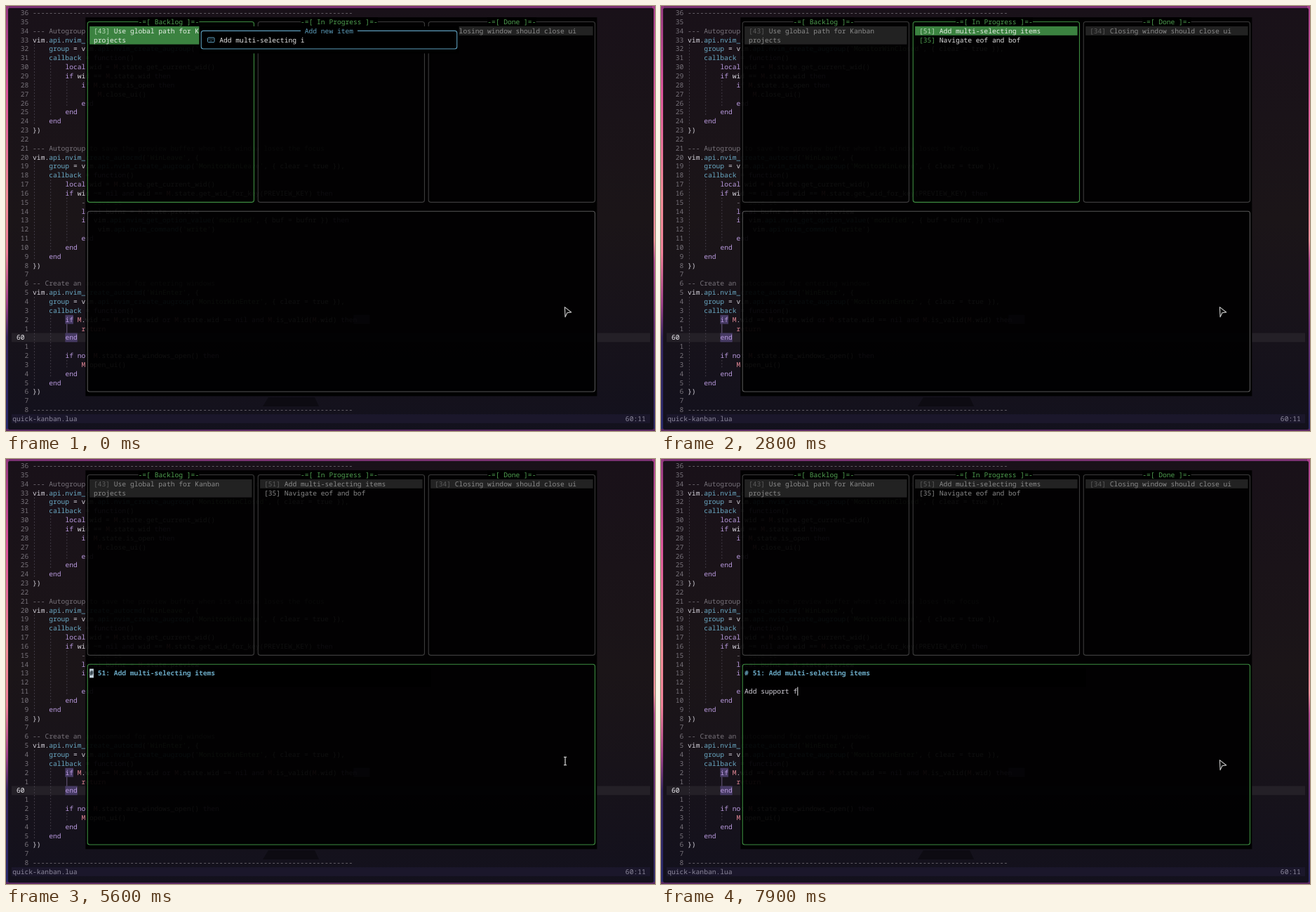
Animation, 925 px wide and 605 px high, one loop 8000 ms. Source, as an HTML page:

```html
<!DOCTYPE html>
<html lang="en">
<head>
<meta charset="utf-8">
<title>Kanban board in a terminal</title>
<style>
  html, body { margin: 0; width: 100%; height: 100%; overflow: hidden; background: #17121a; }
  svg { display: block; width: 925px; height: 605px; }
  text {
    font: 9.643px "Noto Sans Mono", "DejaVu Sans Mono", monospace;
    white-space: pre;
    text-rendering: geometricPrecision;
  }
</style>
</head>
<body>
<svg id="stage" viewBox="0 0 925 605">
  <defs>
    <linearGradient id="left" x2="0" y2="1">
      <stop offset="0" stop-color="#93397f"/><stop offset=".2" stop-color="#d9539a"/>
      <stop offset=".45" stop-color="#f08a96"/><stop offset=".58" stop-color="#ee7f98"/>
      <stop offset=".7" stop-color="#9c3f88"/><stop offset=".78" stop-color="#35265f"/>
      <stop offset="1" stop-color="#28296a"/>
    </linearGradient>
    <linearGradient id="right" x2="0" y2="1">
      <stop offset="0" stop-color="#a8408c"/><stop offset=".25" stop-color="#e0609c"/>
      <stop offset=".55" stop-color="#f0909a"/><stop offset=".6" stop-color="#b04a8e"/>
      <stop offset=".75" stop-color="#6a2f74"/><stop offset="1" stop-color="#2c2a66"/>
    </linearGradient>
    <linearGradient id="term" x2="0" y2="1">
      <stop offset="0" stop-color="#191119"/><stop offset=".5" stop-color="#1b1518"/>
      <stop offset=".72" stop-color="#18131a"/><stop offset="1" stop-color="#13111d"/>
    </linearGradient>
  </defs>
  <g id="editor"></g>
  <g id="board"></g>
</svg>
<script>
const CW = 5.786, RH = 12.84, LOOP = 8000;
const C = {
  white: '#d6d3dc', dim: '#77727a', cyan: '#6aa9c4', violet: '#b99ade', pink: '#dd8593',
  green: '#4f9f50', line: '#3d8c40', select: '#3b8240', grey: '#8a8a8a', guide: '#4a4450',
};

// Grid helpers: column 0 is the first code column, row 0 the top line.
const px = col => 38.1 + col * CW;
const mid = row => 9.7 + row * RH;
const top_ = row => mid(row) - RH / 2;

const rect = (x, y, w, h, fill, more = '') =>
  `<rect x="${x}" y="${y}" width="${w}" height="${h}" fill="${fill}" ${more}/>`;
const cells = (col, row, cols, rows, fill, more) =>
  rect(px(col), top_(row), cols * CW, rows * RH, fill, more);
const text = (col, row, str, fill, more = '') =>
  `<text x="${px(col).toFixed(2)}" y="${(mid(row) + 3.4).toFixed(2)}" fill="${fill}" ${more}>${str}</text>`;
const path = (d, stroke, width = 1, fill = 'none', more = '') =>
  `<path d="${d}" stroke="${stroke}" stroke-width="${width}" fill="${fill}" ${more}/>`;
const frame = (c0, r0, c1, r1, color) =>
  rect(px(c0 + .5), mid(r0), (c1 - c0) * CW, (r1 - r0) * RH, 'none',
    `rx="3" stroke="${color}" stroke-width="1.1"`);

const dashes = '-'.repeat(79);
const code = `${dashes}

--- Autogroup to close all windows when one of them is closed
vim.api.nvim_create_autocmd('WinClosed', {
    group = vim.api.nvim_create_augroup('MonitorWinClosed', { clear = true }),
    callback = function()
        local wid = M.state.get_current_wid()
        if wid == M.state.wid then
            if M.state.is_open then
                M.close_ui()
            end
        end
    end
})

--- Autogroup to save the preview buffer when its window loses the focus
vim.api.nvim_create_autocmd('WinLeave', {
    group = vim.api.nvim_create_augroup('MonitorWinLeave', { clear = true }),
    callback = function()
        local wid = M.state.get_current_wid()
        if wid ~= nil and wid == M.state.get_wid_for_key(PREVIEW_KEY) then
            -- Save it
            local bufnr = M.state.preview
            if vim.api.nvim_get_option_value('modified', { buf = bufnr }) then
                vim.api.nvim_command('write')
            end
        end
    end
})

-- Create an autocommand for entering windows
vim.api.nvim_create_autocmd('WinEnter', {
    group = vim.api.nvim_create_augroup('MonitorWinEnter', { clear = true }),
    callback = function()
        if M.wid == M.state.wid or M.state.wid == nil and M.is_valid(M.wid) then
            return
        end

        if not M.state.are_windows_open() then
            M.open_ui()
        end
    end
})

${dashes}`.split('\n');

const tokens = [
  [/^(local|if|then|end|function|not|and|or|nil)$/, C.violet],
  [/^(return|M)$/, C.pink],
  [/^(api|nvim_\w+|group|callback)$/, C.cyan],
  [/^'/, '#8fb58a'],
];
const paint = line => line.startsWith('--')
  ? `<tspan fill="${C.dim}">${line}</tspan>`
  : line.replace(/'\w+'|\w+/g, word => {
      const rule = tokens.find(([re]) => re.test(word));
      return rule ? `<tspan fill="${rule[1]}">${word}</tspan>` : word;
    });

function drawEditor() {
  let s = rect(0, 0, 925, 605, '#7a3172')
    + rect(0, 0, 4, 605, 'url(#left)') + rect(921, 0, 4, 605, 'url(#right)')
    + rect(0, 602, 925, 3, '#5c2a63')
    + rect(3, 3, 920, 600, 'url(#term)', 'rx="2"')
    + path('M366 570 L374 557 L440 557 L446 570 Z', 'none', 0, '#0d0b12')
    + rect(8, top_(36), 910, RH, '#242027')
    + rect(8, top_(45), 910, RH, '#1b172b')
    + cells(8, 34, 2, 1, '#463a63') + cells(8, 36, 3, 1, '#463a63')
    + cells(79, 34, 4, 1, '#463a63');
  let depth = 0;
  code.forEach((line, row) => {
    const body = line.trimStart();
    const indent = line.length - body.length;
    if (body) depth = indent;
    for (let col = 0; col < Math.min(depth, 12); col += 4) {
      const scope = row === 35 && col === 8;
      const x = px(col) + 2.4;
      s += path(`M${x} ${top_(row)}v${RH}`, scope ? '#75658d' : C.guide, .9, 'none',
        scope ? '' : 'stroke-dasharray="1.8 2.48"');
    }
    s += text(indent, row, paint(body), C.white);
    const n = row === 36 ? '60' : String(Math.abs(36 - row));
    s += row === 36 ? text(-4, row, n, '#f0eef4') : text(-1 - n.length, row, n, C.dim);
  });
  s += text(-5, 45, 'quick-kanban.lua', '#8c889c') + text(146, 45, '60:11', '#8c889c');
  return s + cells(13, 1, 126, 42, '#000', 'fill-opacity=".935"');
}

const items = {
  34: ['Closing window should close ui'],
  35: ['Navigate eof and bof'],
  43: ['Use global path for Kanban', 'projects'],
  51: ['Add multi-selecting items'],
};

function column(col, title, ids, active) {
  let s = frame(col, 1, col + 41, 21, active ? C.line : '#3b3b3b');
  const label = `-=[ ${title} ]=-`;
  const at = col + Math.floor((42 - label.length) / 2);
  s += cells(at, 1, label.length, 1, '#000') + text(at, 1, label, C.green);
  let row = 2;
  ids.forEach((id, i) => {
    const lines = items[id];
    const on = i === 0;
    if (on) s += cells(col + 1, row, 40, lines.length, active ? C.select : '#222');
    const fg = active ? (on ? '#e6efe6' : '#dedede') : C.grey;
    const tag = active ? (on ? '#b9dcb9' : C.green) : (on ? '#5c5c5c' : C.grey);
    s += text(col + 2, row, `[${id}]`, tag);
    lines.forEach((l, k) => { s += text(col + (k ? 2 : 7), row + k, l, fg); });
    row += lines.length;
  });
  return s;
}

function inputBox(value) {
  const k = '#5c9dbb';
  return cells(41, 2, 64, 3, '#000') + frame(41, 2, 104, 4, k)
    + cells(66, 2, 14, 1, '#000') + text(67, 2, 'Add new item', k)
    + rect(287.5, 45, 9.5, 6.6, 'none', `rx="1" stroke="${k}"`)
    + path('M289 47.2h6.5M290.5 49.6h3.5', k, .9, 'none', 'stroke-dasharray="1 .8"')
    + text(46, 3, value, '#e4e4e4');
}

function completion() {
  const m = str => `<tspan fill="${C.cyan}">${str}</tspan>`;
  const rows = [
    [m('su') + 'p~', 'Snippet'], [m('su') + 'b~', 'Snippet'],
    [m('s') + 'trikethrough~', 'Snippet'], ['multi-' + m('s') + 'electing', 'Text'],
  ];
  let s = cells(17, 26, 29, 6, '#17121a') + frame(17, 26, 45, 31, '#80608c');
  rows.forEach(([word, kind], i) => {
    const y = mid(27 + i);
    s += kind === 'Text'
      ? path(`M149 ${y - 3}h3l.6 4 3.4-4h2.5l-6 7h-2z`, 'none', 0, '#a9a5ae')
      : path(`M148.5 ${y - 1}l3-2.5h6v6h-5zM150 ${y + .5}h4M153 ${y - 1.5}h3`, '#a9a5ae', .8);
    s += text(21, 27 + i, word, C.white) + text(37, 27 + i, kind, kind === 'Text' ? C.cyan : C.white);
  });
  return s;
}

const arrow = path('M796.3 428.6l9.4 7.3-5.8.9-2.9 5.9z', '#c9c9c9', 1.1, '#111', 'stroke-linejoin="round"');
const beam = path('M795 424.3h4M797 424.3v11.4M795 435.7h4', '#c9c9c9', 1.3);

function preview({ note, caret, menu }) {
  let s = text(14, 23, '# 51: Add multi-selecting items', C.cyan, 'font-weight="700" style="font-weight:700"');
  if (caret === 'block') {
    s += cells(14, 23, 1, 1, '#c3d3dc') + text(14, 23, '#', '#1c2a33', 'style="font-weight:700"');
  } else {
    const row = note === null ? 24 : 25;
    const str = note || '';
    s += text(14, 25, str, C.white)
      + rect(px(14 + str.length), top_(row) + .3, 1, RH - .6, '#e6e6e6');
  }
  return s + (menu ? completion() : '');
}

function board(st) {
  const todo = st.focus === 0 && !st.input ? [51, 43] : [43];
  const doing = st.focus === 0 ? [35] : [51, 35];
  let s = column(13, 'Backlog', todo, st.focus === 0)
    + column(55, 'In Progress', doing, st.focus === 1)
    + column(97, 'Done', [34], false);
  if (st.focus === 2) s += cells(14, 23, 84, 2, '#000');
  s += frame(13, 22, 138, 42, st.focus === 2 ? C.line : '#555');
  if (st.focus === 2) s += preview(st);
  if (st.input) s += inputBox(st.input);
  return s + (st.beam ? beam : arrow);
}

const typing = 'Add multi-selecting items';
const note = 'Add support f';
const steps = [
  ...[[0, 21], [100, 22], [200, 23], [300, 24], [500, 25]]
    .map(([t, n]) => [t, { focus: 0, input: typing.slice(0, n) }]),
  [700, { focus: 0 }],
  [2400, { focus: 1 }],
  [4800, { focus: 2, caret: 'block' }],
  [5600, { focus: 2, caret: 'block', beam: true }],
  [5800, { focus: 2, caret: 'block' }],
  [5900, { focus: 2, note: null }],
  [6000, { focus: 2, note: '' }],
  ...[[6200, 1], [6300, 2], [6400, 3], [6600, 4], [6800, 5], [6900, 6], [7000, 7],
      [7200, 8], [7300, 9], [7500, 10], [7700, 12], [7900, 13]]
    .map(([t, n]) => [t, { focus: 2, note: note.slice(0, n), menu: n === 5 || n === 6 }]),
];

document.getElementById('editor').innerHTML = drawEditor();
const layer = document.getElementById('board');
const start = performance.now();
let shown = -1;
function tick() {
  const t = (performance.now() - start) % LOOP;
  const i = steps.findLastIndex(([at]) => at <= t);
  if (i !== shown) {
    layer.innerHTML = board(steps[i][1]);
    shown = i;
  }
  requestAnimationFrame(tick);
}
tick();
</script>
</body>
</html>
```
